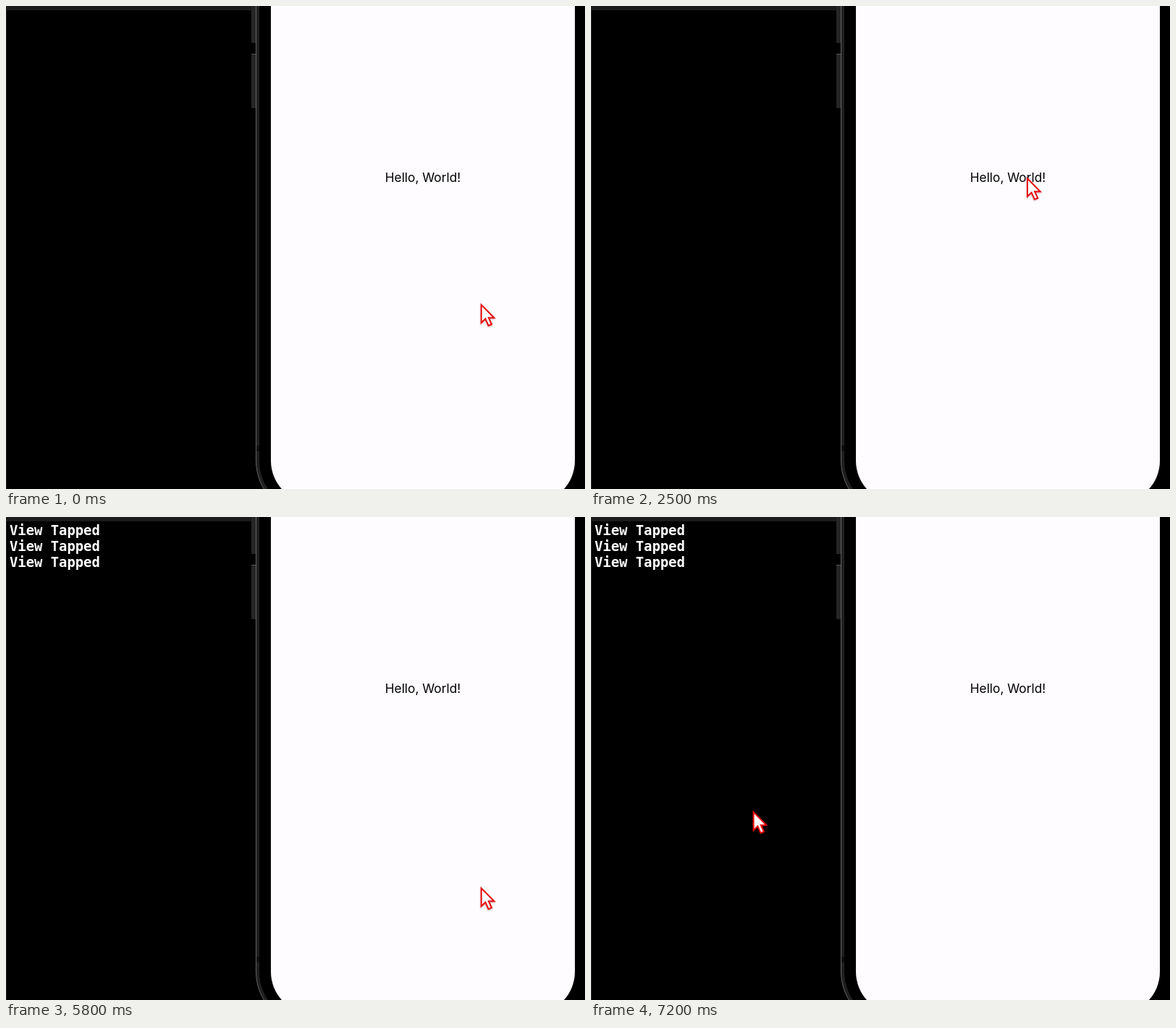
Animation of 800x667 px, one loop 7.3 s. Source, as an HTML page:

```html
<!DOCTYPE html>
<html lang="en">
<head>
<meta charset="utf-8">
<title>Tap logging</title>
<style>
  html, body { margin: 0; width: 100%; height: 100%; overflow: hidden; background: #000; }
  svg { display: block; width: 800px; height: 667px; }
  .ui { font-family: Inter, sans-serif; text-anchor: middle; }
  .log { font: bold 18.85px "DejaVu Sans Mono", monospace; fill: #fff; }
</style>
</head>
<body>
<svg viewBox="0 0 800 667">
  <defs>
    <filter id="glow" x="-40%" y="-40%" width="180%" height="180%">
      <feDropShadow dx="0" dy="1" stdDeviation="1.2" flood-color="#600" flood-opacity=".35"/>
    </filter>
  </defs>

  <rect width="800" height="667"/>
  <rect width="340" height="6" fill="#1c1c1d"/>
  <rect y="6" width="1" height="661" fill="#1b1b1b"/>
  <g class="log">
    <text x="5" y="24.5">View Tapped</text>
    <text x="5" y="46.5">View Tapped</text>
    <text x="5" y="68.5">View Tapped</text>
  </g>

  <!-- phone -->
  <rect x="339" y="-10" width="7" height="61" fill="#262627"/>
  <rect x="339" y="66" width="7" height="75" fill="#262627"/>
  <rect x="339" y="66" width="6" height="1" fill="#555"/>
  <rect x="345.5" y="-99" width="480" height="802" rx="75" fill="#202021" stroke="#626264"/>
  <rect x="346" y="607" width="4" height="8" fill="#111"/>
  <rect x="350" y="-99" width="470" height="797" rx="70"/>
  <rect x="366" y="-99" width="420" height="785" rx="58" fill="#fefcff"/>
  <text class="ui" x="576" y="243" font-size="17.3">Hello, World!</text>

  <g id="dock">
    <rect x="-26" y="625" width="97" height="97" rx="22" fill="#4dd863"/>
    <rect x="98" y="625" width="97" height="97" rx="22" fill="#343362"/>
    <rect x="218" y="649" width="75" height="75" rx="17" fill="#62cf68"/>
  </g>
  <g id="tip">
    <path d="M-33 563H75q4 0 4 4V591q0 4-4 4H33L23 605L13 595H-33Z" fill="#e1dfe3"/>
    <text class="ui" x="24" y="585" font-size="17" fill="#252526">Envelope</text>
  </g>

  <path id="pointer" d="M1.7 2.6V27.4L7.4 22L11.6 31.4L16 29.5L11.8 20.5H19.4Z"
        fill="#fff" stroke="#e50d10" stroke-width="2" filter="url(#glow)"/>
</svg>
<script>
  const LOOP = 7300, STEP = 100;
  const TAPS = [2800, 3800, 5300];

  // Where the hand turns or rests: [time, x, y]
  const STOPS = [
    [0, 655, 410], [500, 654, 410], [800, 661, 433], [1000, 664, 417],
    [1300, 640, 314], [1600, 596, 233], [2100, 601, 235], [4300, 602, 238],
    [4700, 610, 269], [5200, 611, 277], [5800, 655, 510], [6000, 214, 654],
    [6200, 130, 672], [6600, 94, 604], [7000, 222, 405], [LOOP, 223, 405]
  ];

  const at = id => document.getElementById(id);
  const lines = document.querySelectorAll('.log text');
  const move = (id, x, y) => at(id).setAttribute('transform', `translate(${x} ${y})`);
  const show = (el, on) => el.setAttribute('visibility', on ? 'visible' : 'hidden');
  const clamp = v => Math.min(1, Math.max(0, v));

  // Speed at a stop: harmonic mean of both sides, zero where the axis turns
  function speed(i, axis) {
    if (i === 0 || i === STOPS.length - 1) return 0;
    const slope = j => (STOPS[j + 1][axis] - STOPS[j][axis]) / (STOPS[j + 1][0] - STOPS[j][0]);
    const before = slope(i - 1), after = slope(i);
    return before * after > 0 ? 2 * before * after / (before + after) : 0;
  }

  // Smooth cubic between stops, without overshoot
  function glide(t, axis) {
    const i = STOPS.findIndex(stop => stop[0] > t);
    const a = STOPS[i - 1], b = STOPS[i];
    const span = b[0] - a[0], f = (t - a[0]) / span, g = 1 - f;
    return a[axis] + (b[axis] - a[axis]) * f * f * (3 - 2 * f)
      + span * f * g * (g * speed(i - 1, axis) - f * speed(i, axis));
  }

  function draw(now) {
    const t = Math.floor(now % LOOP / STEP) * STEP;
    const fromPeak = Math.abs(t - 6550);
    move('pointer', glide(t, 1), glide(t, 2));
    move('dock', 0, 50 * clamp((fromPeak - 50) / 200));
    show(at('tip'), fromPeak < 100);
    lines.forEach((line, i) => show(line, t >= TAPS[i]));
  }

  const start = performance.now();
  function loop() {
    draw(performance.now() - start);
    requestAnimationFrame(loop);
  }
  loop();
</script>
</body>
</html>
```
